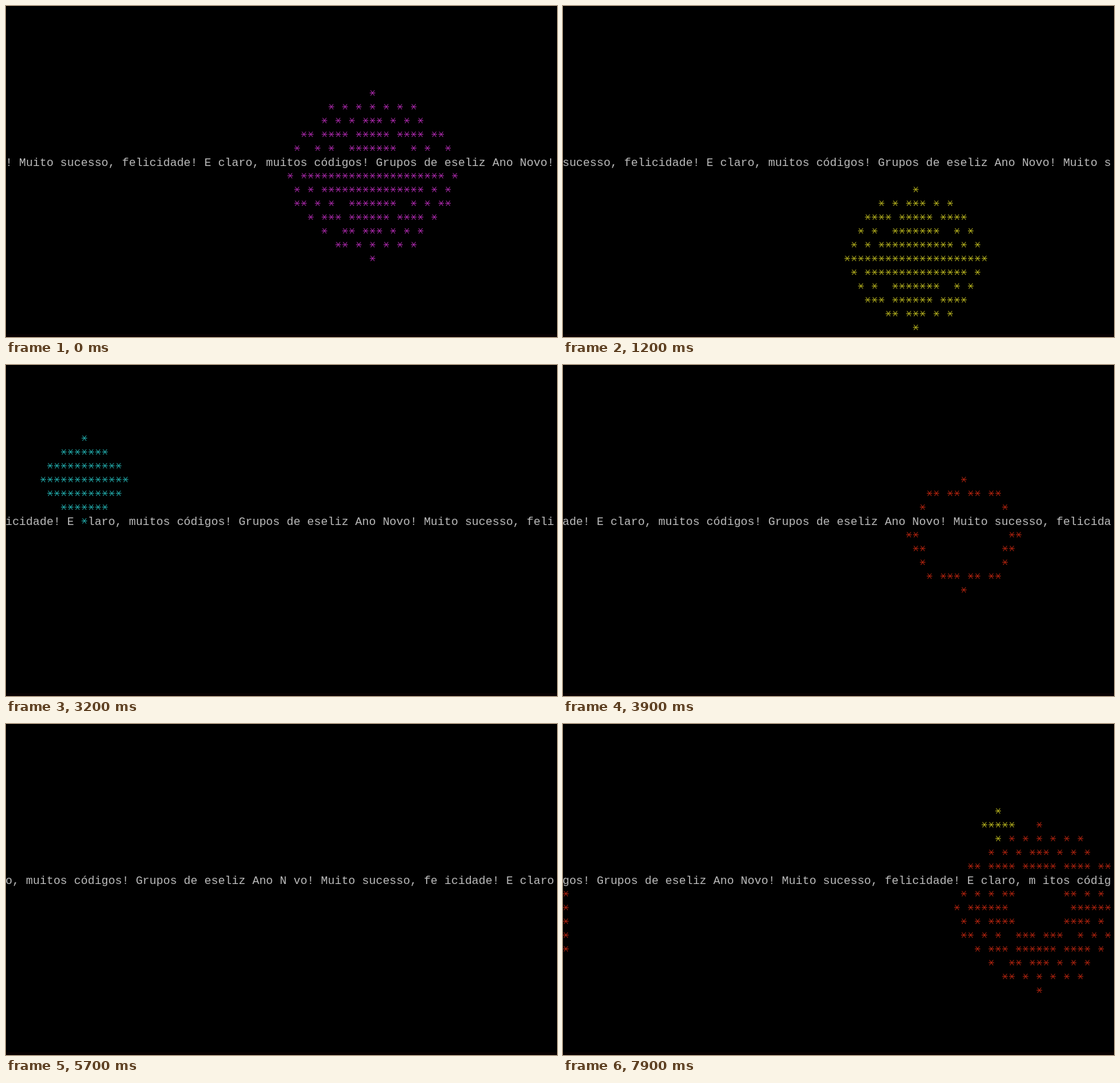
Recreate the animation shown at these times as an HTML page with a canvas. Size 800 by 480 pixels, loop 8 s.

```html
<!DOCTYPE html>
<html lang="pt">
<head>
<meta charset="utf-8">
<title>Feliz Ano Novo</title>
<style>
html, body { margin: 0; width: 100%; height: 100%; overflow: hidden; background: #000; }
#stage { position: relative; width: 800px; height: 480px; overflow: hidden; background: #000; }
#stage::after { content: ""; position: absolute; left: 0; top: 476px; width: 800px; height: 4px; background: #090203; }
canvas { position: absolute; left: 0; top: 0; }
#line {
  position: absolute; left: -0.8px; top: 218px; margin: 0;
  font: 16.6px/20px "Liberation Mono", monospace;
  color: #bcbcbc; white-space: pre;
}
</style>
</head>
<body>
<div id="stage">
  <canvas id="sky" width="800" height="480"></canvas>
  <pre id="line"></pre>
</div>
<script>
const COLS = 80, ROWS = 24, CELL_W = 9.962, CELL_H = 20, TEXT_ROW = 11;
const LOOP = 8000, STEP = 100, FIRST_TICK = -5;
const MESSAGE = "! Muito sucesso, felicidade! E claro, muitos códigos! Grupos de eseliz Ano Novo";

const RED = "#bc2610", GREEN = "#20b820", YELLOW = "#c0bc20",
      BLUE = "#0a20cc", MAGENTA = "#b42cb4", CYAN = "#24b4b4";

// start tick, column, row, number of rings, colour
const BURSTS = [
  [-5, 53, 12, 7, MAGENTA],
  [3, 20, 10, 6, GREEN],
  [12, 51, 18, 5, YELLOW],
  [25, 22, 7, 7, CYAN],
  [28, 4, 15, 3, BLUE],
  [39, 11, 8, 5, CYAN],
  [42, 58, 12, 4, RED],
  [56, 19, 13, 4, YELLOW],
  [60, 52, 10, 6, BLUE],
  [77, 21, 6, 5, GREEN],
  [84, 46, 6, 6, MAGENTA],
  [92, 69, 13, 6, RED],
  [99, 63, 7, 4, YELLOW]
];

// The pace drifts a little: [step, tick]
const PACE = [[0, 0], [12, 16], [22, 28], [32, 41], [47, 58], [63, 79],
              [64, 80], [65, 80], [68, 85], [74, 94], [79, 99]];

const ctx = document.getElementById("sky").getContext("2d");
const line = document.getElementById("line");

function tickAt(step) {
  const i = Math.max(1, PACE.findIndex(p => p[0] >= step));
  const [s0, t0] = PACE[i - 1], [s1, t1] = PACE[i];
  return Math.floor(t0 + (t1 - t0) * (step - s0) / (s1 - s0) + 1e-6);
}

function put(grid, x, y, cell) {
  if (x >= COLS) { x = 0; y++; }
  if (x < 0) x = 0;
  if (y >= 0 && y < ROWS) grid[y][x] = cell;
}

function ring(grid, cx, cy, r, cell) {
  for (let deg = 0; deg < 360; deg += 10) {
    const a = deg * (Math.PI / 180);
    put(grid, cx + Math.trunc(2 * r * Math.cos(a)), cy + Math.trunc(r * Math.sin(a)), cell);
  }
}

// Bursts grow ring by ring, then vanish from the inside; the text is rewritten on even ticks.
function screenAt(tick) {
  const grid = Array.from({ length: ROWS }, () => Array(COLS).fill(null));
  for (let t = FIRST_TICK; t <= tick; t++) {
    for (const [start, cx, cy, size, color] of BURSTS) {
      const age = t - start;
      if (age < 0 || age >= 2 * size) continue;
      ring(grid, cx, cy, age % size + 1, age < size ? { color } : null);
    }
    if (t % 2 === 0) {
      const shift = t / 2 + MESSAGE.length;
      for (let x = 0; x < COLS; x++) {
        grid[TEXT_ROW][x] = { ch: MESSAGE[(x + shift) % MESSAGE.length] };
      }
    }
  }
  return grid;
}

function star(col, row, color) {
  const x = 4.2 + col * CELL_W, y = 6.1 + row * CELL_H;
  ctx.strokeStyle = color;
  ctx.beginPath();
  for (const [dx, dy] of [[4, 0], [2.7, 3.8], [-2.7, 3.8]]) {
    ctx.moveTo(x - dx, y - dy);
    ctx.lineTo(x + dx, y + dy);
  }
  ctx.stroke();
}

function draw(tick) {
  const grid = screenAt(tick);
  ctx.clearRect(0, 0, 800, 480);
  ctx.lineWidth = 1;
  grid.forEach((cells, row) => cells.forEach((cell, col) => {
    if (cell && cell.color) star(col, row, cell.color);
  }));
  line.textContent = grid[TEXT_ROW].map(c => c && c.ch || " ").join("");
}

let shown = null;
const begin = performance.now();

function frame() {
  const time = Math.max(0, performance.now() - begin) % LOOP;
  const tick = tickAt(Math.floor(time / STEP));
  if (tick !== shown) draw(shown = tick);
  requestAnimationFrame(frame);
}
frame();
</script>
</body>
</html>
```
